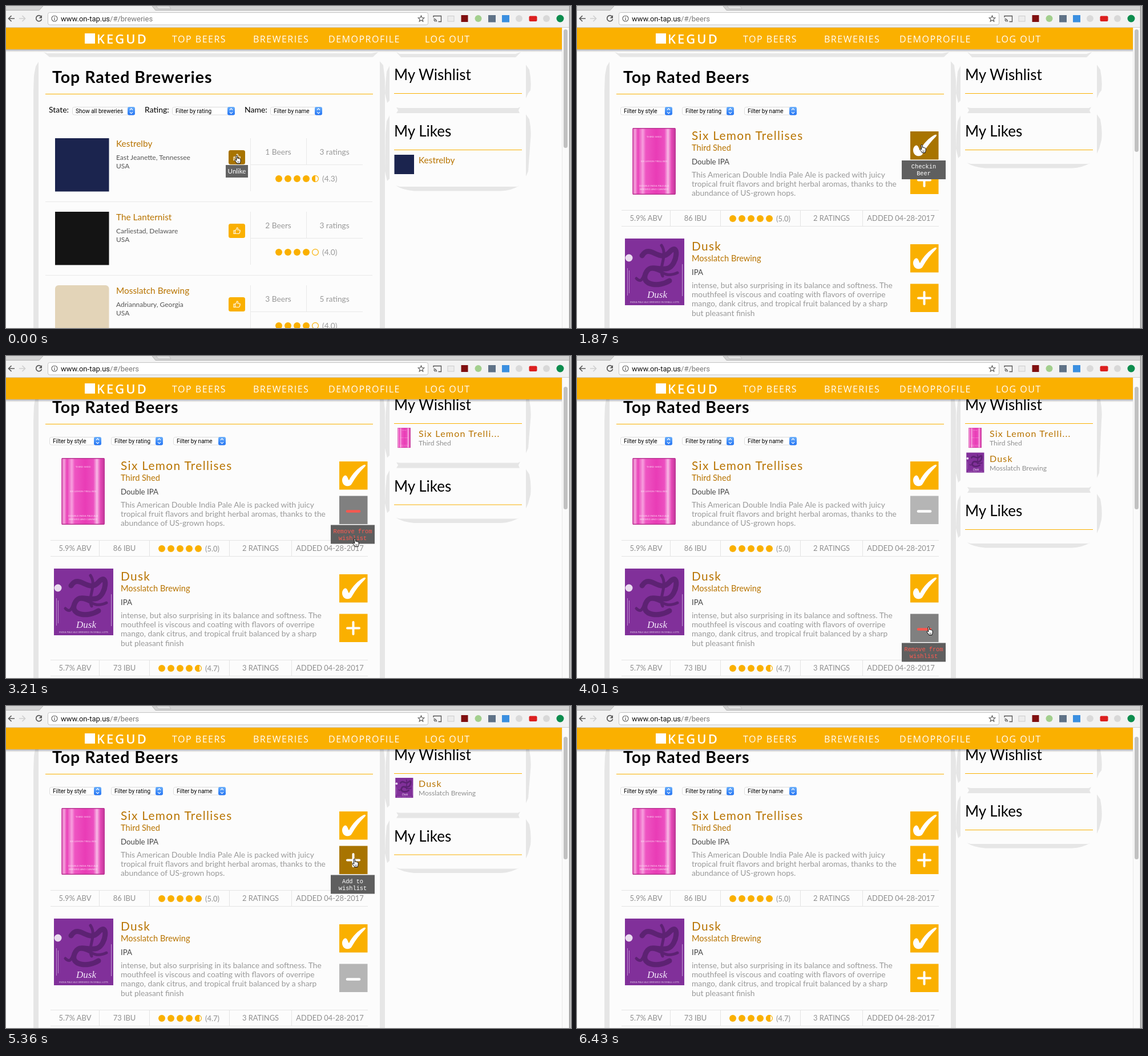
An HTML page that plays this animation: 990 by 565 pixels, repeating every 6.7 s.

```html
<!DOCTYPE html>
<html lang="en">
<head>
<meta charset="utf-8">
<title>Brewery list</title>
<style>
  html, body { margin: 0; width: 100%; height: 100%; overflow: hidden; background: #fcfcfc; }
  svg { display: block; width: 990px; height: 565px; font-family: Lato, sans-serif; }
  text { white-space: pre; }
  .nav { font: 400 16px "Open Sans", sans-serif; letter-spacing: 1.5px; fill: #fff; }
  .logo { font: 600 22px "Open Sans", sans-serif; letter-spacing: 3px; fill: #fff; }
  .url { font: 13px Roboto, sans-serif; fill: #777; }
  .title { font-size: 28.5px; font-weight: 700; letter-spacing: 1px; }
  .side { font-size: 26px; }
  .label { font-size: 14px; }
  .select { font: 10px Roboto, sans-serif; }
  .brewery { font-size: 15.4px; fill: #b87400; }
  .address { font-size: 12px; fill: #555; }
  .beer { font-size: 20.8px; letter-spacing: 1.35px; fill: #b87400; }
  .maker { font-size: 14.6px; fill: #b87400; }
  .style { font-size: 13.3px; fill: #444; }
  .desc { font-size: 13.8px; fill: #999; }
  .count { font-size: 13.7px; fill: #999; }
  .stat { font-size: 12.9px; fill: #8f8f8f; }
  .wish { font-size: 16px; letter-spacing: 1.2px; fill: #b87400; }
  .by { font-size: 12px; fill: #8f8f8f; }
  .tip { font-size: 11.5px; fill: #fff; }
  .mono { font: 10.3px "Liberation Mono", monospace; }
  .tiny { font-size: 4.5px; fill: #fff; opacity: .75; }
  .script { font: italic 17px "Liberation Serif", serif; fill: #f4e8fa; }
  .mid { text-anchor: middle; }
</style>
</head>
<body>
<svg id="stage" viewBox="0 0 990 565"></svg>
<script>
const LOOP = 6700;
const ORANGE = '#fab000', DARK = '#a87400', BRUSH = '#e6e6e6', RULE = '#e9e9e9';

// time, changes to the running state
const steps = [
  [0, { page: 'breweries', url: 'breweries', scroll: 0, wish: '', liked: true, hover: 'like', at: [400, 262] }],
  [270, { liked: false }],
  [530, { hover: '', at: [364, 67] }],
  [800, { hover: 'top', at: [357, 63] }],
  [1070, { url: 'beers' }],
  [1330, { page: 'beers' }],
  [1600, { hover: '', at: [551, 269] }],
  [1870, { hover: 'check0', at: [600, 243] }],
  [2140, { hover: 'list0', at: [603, 309] }],
  [2410, { at: [605, 312] }],
  [2680, { wish: '0' }],
  [3210, { scroll: 35, at: [607, 320] }],
  [3480, { hover: 'check1', at: [606, 461] }],
  [3740, { hover: 'list1', at: [612, 475] }],
  [4010, { wish: '01' }],
  [4280, { at: [613, 473] }],
  [4550, { hover: '', at: [606, 294] }],
  [4820, { hover: 'list0', at: [606, 268] }],
  [5360, { wish: '1' }],
  [5620, { hover: 'check1', at: [606, 461] }],
  [5890, { hover: 'list1', at: [613, 476] }],
  [6160, { wish: '' }],
  [6430, { hover: '', at: null }]
];

const breweries = [
  { name: 'Kestrelby', place: 'East Jeanette, Tennessee', beers: 1, ratings: 3, score: 4.3, color: '#1b244e' },
  { name: 'The Lanternist', place: 'Carliestad, Delaware', beers: 2, ratings: 3, score: 4, color: '#141414' },
  { name: 'Mosslatch Brewing', place: 'Adriannabury, Georgia', beers: 3, ratings: 5, score: 4, color: '#e3d4b8', round: 6 }
];

const beers = [
  { name: 'Six Lemon Trellises', short: 'Six Lemon Trelli...', maker: 'Third Shed', style: 'Double IPA',
    desc: ['This American Double India Pale Ale is packed with juicy',
      'tropical fruit flavors and bright herbal aromas, thanks to the',
      'abundance of US-grown hops.'],
    abv: '5.9', ibu: 86, score: 5, ratings: 2, y: 214, check: 220, list: 280.5, stats: 358, art: can },
  { name: 'Dusk', short: 'Dusk', maker: 'Mosslatch Brewing', style: 'IPA',
    desc: ['intense, but also surprising in its balance and softness. The',
      'mouthfeel is viscous and coating with flavors of overripe',
      'mango, dank citrus, and tropical fruit balanced by a sharp',
      'but pleasant finish'],
    abv: '5.7', ibu: 73, score: 4.7, ratings: 3, y: 408, check: 418, list: 487.5, stats: 568, art: label }
];

const text = (x, y, cls, str, extra = '') => `<text x="${x}" y="${y}" class="${cls}" ${extra}>${str}</text>`;
const rect = (x, y, w, h, fill, extra = '') => `<rect x="${x}" y="${y}" width="${w}" height="${h}" fill="${fill}" ${extra}/>`;
const circle = (x, y, r, fill, extra = '') => `<circle cx="${x}" cy="${y}" r="${r}" fill="${fill}" ${extra}/>`;
const path = (d, fill, extra = '') => `<path d="${d}" fill="${fill}" ${extra}/>`;
const line = (d, color, width = 1, extra = '') => path(d, 'none', `stroke="${color}" stroke-width="${width}" ${extra}`);
const group = (x, y, body, scale = 1) => `<g transform="translate(${x} ${y}) scale(${scale})">${body}</g>`;
const each = (list, fn) => list.map(fn).join('');

const defs = `<defs>
  <linearGradient id="can">${each([
    [0, '#c93b9f'], [.06, '#f6a4dd'], [.13, '#e93fb8'], [.24, '#f7a0de'], [.31, '#ee55c2'],
    [.55, '#e93cb6'], [.74, '#ec4fc0'], [.82, '#f9b9e6'], [.9, '#e64ab8'], [1, '#bd3595']
  ], ([at, color]) => `<stop offset="${at}" stop-color="${color}"/>`)}</linearGradient>
  <linearGradient id="blue" x2="0" y2="1"><stop stop-color="#6cb0fa"/><stop offset="1" stop-color="#2474f4"/></linearGradient>
  <linearGradient id="shade" x2="0" y2="1"><stop stop-color="#000" stop-opacity=".3"/><stop offset="1" stop-color="#000" stop-opacity="0"/></linearGradient>
</defs>`;

function can() {
  return group(97, 0, rect(0, 0, 76, 117, 'url(#can)', 'rx="2"')
    + rect(1, 0, 74, 1.5, '#b8328f') + rect(1, 115.5, 74, 1.5, '#b8328f')
    + text(38, 17, 'tiny mid', 'THIRD SHED') + text(38, 60, 'tiny mid', 'SIX LEMON TRELLISES')
    + text(38, 103, 'tiny mid', 'DOUBLE INDIA PALE ALE') + text(38, 109, 'tiny mid', 'BREWED AND CANNED'));
}

function label() {
  const dark = '#5d2273';
  return group(84, 0, rect(0, 0, 104, 117, '#81309a')
    + line('M30 30C44 8 60 44 78 24S92 46 76 52 44 42 36 62 60 86 78 74', dark, 9, 'stroke-linecap="round"')
    + line('M20 70C34 84 30 52 48 54S70 70 92 60M64 12C76 30 58 50 66 66', dark, 5, 'stroke-linecap="round"')
    + circle(7, 34, 6.5, '#eadcf0')
    + rect(4, 52, 1, 48, '#b98acb') + rect(7, 56, 1, 40, '#b98acb') + rect(100, 45, 1.2, 56, '#b98acb')
    + text(39, 104, 'script', 'Dusk')
    + text(52, 113, 'tiny mid', 'INDIA PALE ALE BREWED IN SMALL LOTS'));
}

function dots(x, y, score) {
  return each([0, 1, 2, 3, 4], i => {
    const cx = x + i * 16, part = Math.min(1, Math.max(0, score - i));
    if (part === 1) return circle(cx, y, 6, ORANGE);
    const half = part > .5 ? `M${cx + 2} ${y - 5.6}A6 6 0 1 0 ${cx + 2} ${y + 5.6}z` : `M${cx} ${y - 6}a6 6 0 0 0 0 12z`;
    return circle(cx, y, 5.4, 'none', `stroke="${ORANGE}" stroke-width="1.2"`) + (part ? path(half, ORANGE) : '');
  });
}

function select(x, end, str) {
  return rect(x + .5, 177.5, end - x - 1, 13.5, '#fff', 'rx="3" stroke="#d4d4d4" stroke-width=".8"')
    + rect(end - 13, 177, 13, 14.5, 'url(#blue)', 'rx="3"')
    + line(`M${end - 9} 182.5l2.5-2.6 2.5 2.6m-5 3.6l2.5 2.6 2.5-2.6`, '#fff', 1.2)
    + text(x + 6, 187.5, 'select', str);
}

function breweryRow(b, i, s) {
  const hot = i === 0 && s.hover === 'like';
  const thumb = 'M-5.5-.5h2.5v5.5h-2.5zM-3-.3l2.2-2.2c.5-.8.3-2.6 1-3 1.4-.3 2 1 1.8 2.2l-.6 1.8h3.2c1.4 0 1.4 1.4.7 1.8.6.6.3 1.6-.3 1.9.3.7 0 1.4-.6 1.6 0 .8-.4 1.2-1.2 1.2h-2.4c-1.2 0-2-.5-3.6-.5';
  return group(0, i * 129,
    rect(86, 232, 94.5, 93.5, b.color, `rx="${b.round || 0}"`)
    + text(193, 247, 'brewery', b.name)
    + text(193, 270, 'address', b.place) + text(193, 284.5, 'address', 'USA')
    + rect(390, 253, 29, 25, hot ? DARK : ORANGE, 'rx="3.5"')
    + group(404.5, 265.5, line(thumb, '#fff', 1.1))
    + line('M428.5 232V325M526.5 232V278M428 278.5H625M69 343.5H642', RULE)
    + text(477, 261, 'count mid', `${b.beers} Beers`) + text(575.5, 261, 'count mid', `${b.ratings} ratings`)
    + dots(478, 303, b.score) + text(554, 308, 'count', `(${b.score.toFixed(1)})`)
    + (hot ? rect(385, 279, 39, 22, '#626262') + text(404.5, 294, 'tip mid', s.liked ? 'Unlike' : 'Like') : ''));
}

function breweryPage(s) {
  return text(81, 135, 'title', 'Top Rated Breweries')
    + text(75, 187, 'label', 'State:') + select(116, 226, 'Show all breweries')
    + text(243, 187, 'label', 'Rating:') + select(291, 401, 'Filter by rating')
    + text(418, 187, 'label', 'Name:') + select(463, 554, 'Filter by name')
    + each(breweries, (b, i) => breweryRow(b, i, s));
}

function checkButton(y, hot) {
  return group(584, y, rect(0, 0, 49.5, 49.5, hot ? DARK : ORANGE)
    + path('M5 33C5 28 9 23 12 25 15 27 15 31 17 33 23 21 33 11 43 6 46 5 47 6 45 9 36 18 28 28 22 39 20 43 16 44 12 43 8 42 5 38 5 33z', '#fff'));
}

function listButton(y, hot, listed) {
  const fill = listed ? (hot ? '#808080' : '#b5b5b5') : (hot ? DARK : ORANGE);
  const d = listed ? 'M14 27H35' : 'M14 25H35M24.5 14.5V35.5';
  return group(584, y, rect(0, 0, 49.5, 49.5, fill)
    + line(d, listed && hot ? '#f8584f' : '#fff', listed ? 4.6 : 4, 'stroke-linecap="round"'));
}

function tip(y, lines, color = '#fff') {
  return rect(569, y + 51, 77, 33, '#5f5f5f')
    + each(lines, (str, i) => text(607.5, y + 65 + i * 12, 'mono mid', str, `fill="${color}"`));
}

function beerRow(b, i, s) {
  const { y, stats } = b, listed = s.wish.includes(i);
  const onCheck = s.hover === 'check' + i, onList = s.hover === 'list' + i;
  return group(0, y, b.art())
    + text(201, y + 21, 'beer', b.name) + text(201, y + 40, 'maker', b.maker) + text(201, y + 63.5, 'style', b.style)
    + each(b.desc, (str, n) => text(201, y + 87 + n * 16.2, 'desc', str))
    + line(`M78 ${stats + .5}H634M78 ${stats + 28.5}H634M163.5 ${stats}v29M251.5 ${stats}v29M391.5 ${stats}v29M500.5 ${stats}v29`, '#e4e4e4')
    + each([[121, `${b.abv}% ABV`], [207.5, `${b.ibu} IBU`], [446, `${b.ratings} RATINGS`], [567.5, 'ADDED 04-28-2017']],
      ([x, str]) => text(x, stats + 19, 'stat mid', str))
    + dots(273, stats + 15, b.score) + text(349, stats + 19.5, 'stat', `(${b.score.toFixed(1)})`)
    + checkButton(b.check, onCheck) + listButton(b.list, onList, listed)
    + (onCheck ? tip(b.check, ['Checkin', 'Beer']) : '')
    + (onList ? listed ? tip(b.list, ['Remove from', 'wishlist'], '#ff5a50') : tip(b.list, ['Add to', 'wishlist']) : '');
}

function beerPage(s) {
  return text(81, 135, 'title', 'Top Rated Beers')
    + select(76, 167, 'Filter by style') + select(184, 275, 'Filter by rating') + select(293, 385, 'Filter by name')
    + each(beers, (b, i) => beerRow(b, i, s));
}

// brushed grey edges of a side card whose bottom strip starts at y
function edges(top, y, rounded) {
  const bottom = rounded
    ? `M683 ${y}L690 ${y + 2}H895L900 ${y}Q885 ${y + 9} 868 ${y + 9.5}H715Q695 ${y + 8} 683 ${y}z`
    : `M684 ${y}L690 ${y + 1}H897L901 ${y - 1}L898 ${y + 5}L900 ${y + 10}H684L687 ${y + 5}z`;
  return path(bottom
    + `M911 ${top}L917 ${top + 9}Q921 ${top + 28} 919 ${top + 45}L915 ${y - 25}L911 ${y - 16}z`
    + `M672 ${top + 2}L667 ${top + 12}L665 ${top + 35}L664 ${y - 25}L668 ${y - 8}L672 ${y - 12}z`, BRUSH);
}

function sidebar(s) {
  const wishes = [...s.wish].map(i => beers[i]), shift = wishes.length * 43.5;
  const [first] = breweries;
  const wishCard = path('M684 81L690 84H893L902 81L893 90H692z', BRUSH)
    + edges(103, 178 + shift, false)
    + text(680, 130, 'side', 'My Wishlist')
    + line('M680 153.5H904', ORANGE)
    + each(wishes, (b, i) => group(0, i * 43.5,
      group(657, 161, b.art(), .3) + text(723, 177, 'wish', b.short) + text(723, 192, 'by', b.maker)));
  const likeCard = edges(190, s.liked ? 315 : 275, true)
    + text(680, 229, 'side', 'My Likes')
    + line('M680 252.5H904', ORANGE)
    + (s.liked ? rect(680.5, 261, 34.5, 34, first.color) + text(723, 276, 'brewery', first.name) : '');
  return wishCard + group(0, shift, likeCard);
}

function mainCard() {
  return path('M66 81L72 83H640L652 81L643 89.5H76z', BRUSH)
    + path('M57 98L52 106L49 122L48 150V620H57z', BRUSH)
    + path('M655 97L661 104L664 130V620H655z', BRUSH)
    + line('M69 154.5H643', ORANGE);
}

function navBar(s) {
  return rect(0, 76, 974, 5, 'url(#shade)') + rect(0, 38, 974, 38, ORANGE)
    + (s.hover === 'top' ? rect(266, 38, 145, 38, '#f76400') : '')
    + rect(138, 48, 18, 18, '#fff') + text(159, 66, 'logo', 'KEGUD')
    + each([[291, 'TOP BEERS'], [433, 'BREWERIES'], [565, 'DEMOPROFILE'], [734, 'LOG OUT']],
      ([x, str]) => text(x, 63.5, 'nav', str));
}

function chrome(s) {
  const tabs = rect(0, 0, 990, 8, '#d3d3d3') + path('M58 8L65 0H256L262 8z', '#f2f2f2')
    + line('M0 7.5H58L65 0M256 0L262 7.5H990', '#b5b5b5')
    + path('M263 0H286L289 5H267z', '#e2e2e2', 'stroke="#b5b5b5" stroke-width=".7"');
  const arrow = 'M15 22H5M9.5 17L4.5 22L9.5 27';
  const bar = rect(0, 8, 990, 30, '#f2f2f2') + rect(0, 37, 990, 1, '#d0d0d0')
    + line(arrow, '#5a5a5a', 1.7) + group(38, 0, `<g transform="scale(-1 1)">${line(arrow, '#cfcfcf', 1.7)}</g>`)
    + line('M61.5 18.5A5 5 0 1 0 62.5 23', '#5a5a5a', 1.7) + path('M63 16v5.5h-5.5z', '#5a5a5a')
    + rect(73.5, 11.5, 666, 21.5, '#fff', 'rx="3" stroke="#c4c4c4"')
    + circle(85, 22, 5, 'none', 'stroke="#666" stroke-width="1.2"') + line('M85 21v4M85 18.8v1.3', '#666', 1.3)
    + text(96, 27, 'url', `<tspan fill="#111">www.on-tap.us</tspan>/#/${s.url}`)
    + line('M727.5 17l1.5 3.5 3.8.3-2.9 2.5.9 3.7-3.3-2-3.3 2 .9-3.7-2.9-2.5 3.8-.3z', '#555', 1.1);
  const icons = line('M749 20v-2.5h13.5v10h-5M749.5 22.5a5 5 0 0 1 5 5M749.5 25a2.5 2.5 0 0 1 2.5 2.5', '#555', 1.3)
    + rect(774, 17.5, 11, 9.5, '#ececec', 'stroke="#ccc"')
    + rect(797.5, 16, 12, 12, '#800f10')
    + circle(827.5, 22, 6, '#a2cf8d')
    + rect(845, 16, 13, 12.5, '#5f7287')
    + rect(869, 16, 13, 12.5, '#3b8fe0')
    + circle(899, 22, 6, '#dadada')
    + rect(916.5, 17.5, 14, 9.5, '#dc2020', 'rx="2"')
    + circle(947, 22, 6, '#d8d8d8')
    + circle(971, 22, 6.5, '#0c8c4d');
  return tabs + bar + icons;
}

function scrollbar(s) {
  const height = s.page === 'beers' ? 215 : 208;
  return rect(974, 38, 13, 527, '#fafafa') + rect(974, 38, 1, 527, '#e8e8e8')
    + rect(977, s.scroll ? 54 : 41, 7, height, '#c1c1c1', 'rx="3.5"')
    + rect(986.5, 0, 3.5, 565, '#c2c2c2') + rect(987, 0, 1, 565, '#8d8d8d');
}

function hand([x, y]) {
  const d = 'M3 1.6c0-1.6 2.3-1.6 2.4 0l.3 4c.5-.8 1.8-.6 2 .2.6-.6 1.7-.3 1.8.5.8-.4 1.6.1 1.6 1v3.2c0 1.2-.8 2-1 4h-5.6c-.4-1.6-2-3-3.3-5.2-.8-1.4.9-2 1.8-1l.9.9z';
  return group(x, y, path(d, '#fff', 'stroke="#000" stroke-linejoin="round"') + line('M6 10.5v2.5M8 10.5v2.5', '#000', .7));
}

function scene(s) {
  return defs + rect(0, 0, 990, 565, '#fcfcfc')
    + group(0, -s.scroll, mainCard() + sidebar(s) + (s.page === 'beers' ? beerPage(s) : breweryPage(s)))
    + navBar(s) + chrome(s) + scrollbar(s) + (s.at ? hand(s.at) : '');
}

const states = [];
steps.reduce((last, [, change]) => {
  states.push({ ...last, ...change });
  return states[states.length - 1];
}, {});

const stage = document.getElementById('stage');
let shown = -1;

function draw() {
  const t = performance.now() % LOOP;
  const now = steps.findLastIndex(([start]) => start <= t);
  if (now !== shown) stage.innerHTML = scene(states[shown = now]);
  requestAnimationFrame(draw);
}
draw();
</script>
</body>
</html>
```
